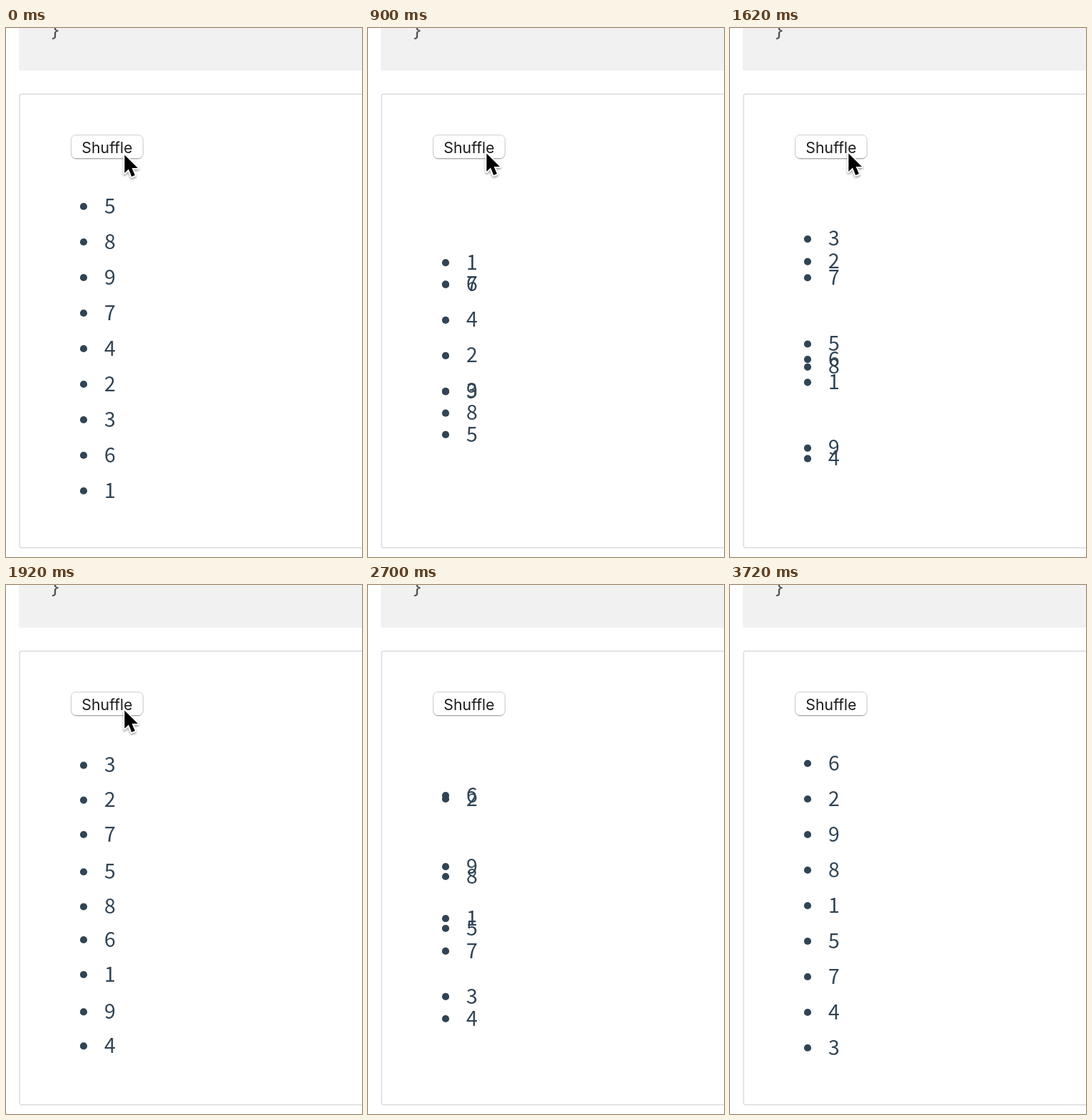
Animation of 500x744 px, one loop 3780 ms. Source, as an HTML page:

```html
<!DOCTYPE html>
<html lang="en">
<head>
<meta charset="utf-8">
<title>List shuffle</title>
<style>
  html, body { margin: 0; width: 100%; height: 100%; overflow: hidden; background: #fff; }
  svg { display: block; width: 500px; height: 744px; }
  .code { font: 27px "Noto Sans Mono", "DejaVu Sans Mono", monospace; fill: #525252; }
  .label { font: 21.3px Inter, Roboto, sans-serif; fill: #1c1c1e; }
  .list { font: 28.7px "Noto Sans CJK JP", "Noto Sans CJK SC", "Noto Sans CJK", "Noto Sans", sans-serif; fill: #304455; }
  text { text-anchor: middle; }
</style>
</head>
<body>
<svg viewBox="0 0 500 744" xmlns="http://www.w3.org/2000/svg">
  <defs>
    <linearGradient id="edge" x1="0" y1="0" x2="0" y2="1">
      <stop offset="0" stop-color="#d0d0d0"/>
      <stop offset=".8" stop-color="#c6c6c6"/>
      <stop offset="1" stop-color="#adadad"/>
    </linearGradient>
    <linearGradient id="blue" x1="0" y1="0" x2="0" y2="1">
      <stop offset="0" stop-color="#65aef8"/>
      <stop offset="1" stop-color="#1268f0"/>
    </linearGradient>
    <filter id="shade" x="-50%" y="-50%" width="200%" height="200%">
      <feDropShadow dx="0" dy="2" stdDeviation="1.6" flood-opacity=".4"/>
    </filter>
  </defs>
  <rect width="500" height="744" fill="#fff"/>
  <rect x="18" y="-10" width="500" height="70" rx="3" fill="#f1f1f1"/>
  <text class="code" x="69" y="12">}</text>
  <rect x="19" y="93" width="520" height="638" rx="3" fill="#fff" stroke="#e4e4e4" stroke-width="2"/>

  <rect x="92" y="152" width="100" height="33" rx="7" fill="#000" opacity=".14"/>
  <rect id="face" x="91.5" y="150.5" width="101" height="33" rx="6.5"/>
  <text id="label" class="label" x="142" y="176">Shuffle</text>

  <g id="list" class="list"></g>

  <circle id="ring" cx="166" cy="176" r="43" fill="none" stroke="#555" stroke-width="2"/>
  <path id="cursor" d="M0 0V25.5L5.7 20L10 30.4L14.6 28.5L10.3 18.4H18.6Z"
    stroke="#fff" stroke-width="3.6" paint-order="stroke" stroke-linejoin="round" filter="url(#shade)"/>
</svg>
<script>
const LOOP = 3780, STEP = 60, MOVE = 857;
const TOP = 251, ROW = 50;
const START = "589742361";
// click: rows freeze where they are; go: they ease to the new order
const SHUFFLES = [
  { click: 437,  go: 471.5, order: "167423985" },
  { click: 1144, go: 1178,  order: "327586194" },
  { click: 2222, go: 2256,  order: "629815743" }
];
const PRESS = 75, CURSOR_OUT = 2500;

const $ = id => document.getElementById(id);
const clamp = x => Math.min(1, Math.max(0, x));

// cubic-bezier(.25, .1, .25, 1)
function ease(x) {
  x = clamp(x);
  let lo = 0, hi = 1;
  for (let i = 0; i < 30; i++) {
    const u = (lo + hi) / 2;
    if (0.75 * u - 0.75 * u * u + u * u * u < x) lo = u; else hi = u;
  }
  const u = (lo + hi) / 2, v = 1 - u;
  return 0.3 * u * v * v + 3 * u * u * v + u * u * u;
}

const slotY = (order, digit) => TOP + ROW * order.indexOf(digit);

function rowY(digit, t) {
  let y = slotY(START, digit);
  SHUFFLES.forEach((s, i) => {
    if (t < s.click) return;
    const next = SHUFFLES[i + 1];
    const until = next ? Math.min(t, next.click) : t;
    y += (slotY(s.order, digit) - y) * ease((until - s.go) / MOVE);
  });
  return y;
}

function add(parent, tag, attrs) {
  const el = document.createElementNS("http://www.w3.org/2000/svg", tag);
  for (const k in attrs) el.setAttribute(k, attrs[k]);
  return parent.appendChild(el);
}

const rows = [...START].map(digit => {
  const g = add($("list"), "g", {});
  add(g, "circle", { cx: 109, cy: 0, r: 5.1 });
  add(g, "text", { x: 146, y: 9.6 }).textContent = digit;
  return { digit, g };
});

function draw(t) {
  for (const { digit, g } of rows)
    g.setAttribute("transform", `translate(0 ${rowY(digit, t).toFixed(2)})`);

  const down = SHUFFLES.some(s => {
    const up = s.click - 2;
    return t >= up - PRESS && t < up;
  });
  $("face").setAttribute("fill", down ? "url(#blue)" : "#fff");
  $("face").setAttribute("stroke", down ? "#1a66d8" : "url(#edge)");
  $("label").style.fill = down ? "#fff" : "";
  $("ring").style.display = down ? "" : "none";

  const cy = 178.5 - 2 * clamp((t - 60) / 240);
  $("cursor").setAttribute("transform", `translate(166.5 ${cy})`);
  $("cursor").style.display = t < CURSOR_OUT ? "" : "none";
}

function tick() {
  const t = Math.floor((performance.now() + 16) / STEP) * STEP;
  draw(t % LOOP);
  requestAnimationFrame(tick);
}
tick();
</script>
</body>
</html>
```
